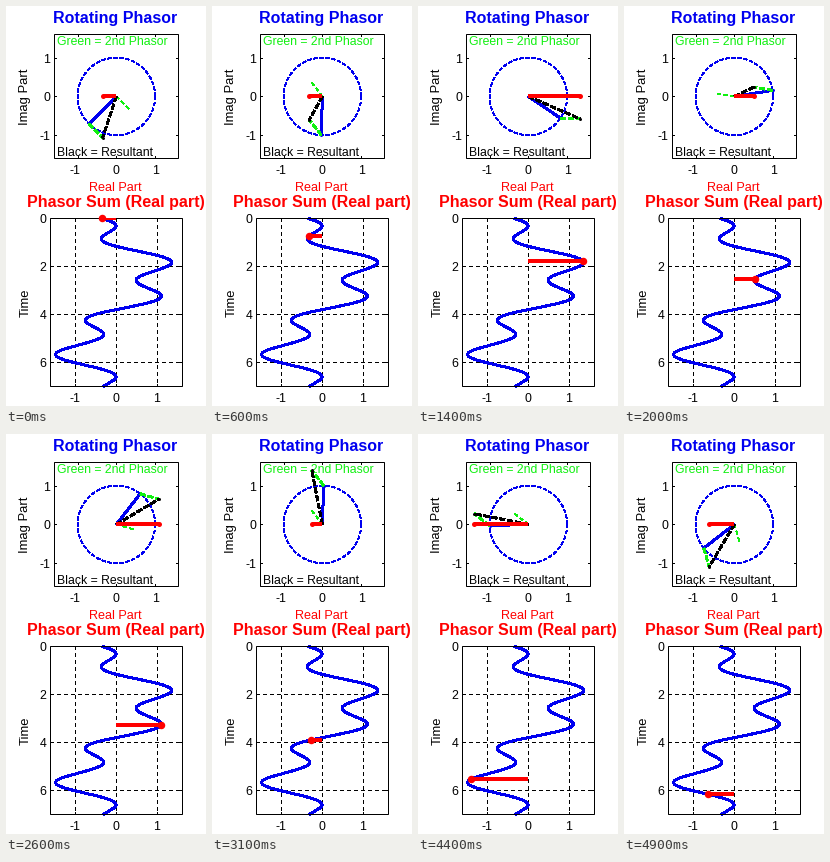
These frames come from a looping animation (200 px wide and 400 px high, 5 s). A matplotlib script:

```python
import numpy as np
import matplotlib.pyplot as plt
from matplotlib.animation import FuncAnimation
from matplotlib.patches import Rectangle

WIDTH, HEIGHT, DPI = 200, 400, 100
PX = 72 / DPI  # points per pixel
FRAMES, INTERVAL = 50, 100
BLUE, RED, GREEN, BLACK = "#0000f0", "#ff0000", "#10f010", "#000000"

CX, CY, UNIT = 110, 90, 38.75       # phasor plot: centre and pixels per unit
TOP, X_UNIT, T_UNIT = 212, 41, 24   # time plot: start and pixels per unit
SHIFT = 0.4  # puts whole coordinates near pixel centres, so lines snap in place

plt.rcParams["font.family"] = "Liberation Sans"
fig = plt.figure(figsize=(WIDTH / DPI, HEIGHT / DPI), dpi=DPI, facecolor="white")
ax = fig.add_axes([0, 0, 1, 1])
ax.set_xlim(-SHIFT, WIDTH - SHIFT)
ax.set_ylim(HEIGHT - SHIFT, -SHIFT)
ax.axis("off")


def first(t):
    return np.exp(1j * (t - 3 * np.pi / 4))


def second(t):
    return 0.5 * np.exp(1j * (4 * t - np.pi / 4))


def line(xs=(), ys=(), color=BLACK, width=1, dash=None, dot=0, z=2):
    style = (0, dash) if dash else "-"
    return ax.plot(xs, ys, color=color, lw=width * PX, ls=style, zorder=z,
                   marker="o" if dot else None, markevery=[-1] if dot else None,
                   ms=dot * PX, mew=0, solid_capstyle="butt",
                   dash_capstyle="butt", antialiased=False)[0]


def label(x, y, text, size=12.4, color=BLACK, ha="center", va="baseline", **kw):
    ax.text(x, y, text, fontsize=size * PX, color=color, ha=ha, va=va, **kw)


def frame_box(x, y, w, h, x_ticks, y_ticks):
    box = Rectangle((x, y), w, h, fill=False, ec=BLACK, lw=PX, zorder=3)
    ax.add_patch(box)
    for tx in x_ticks:
        line([tx, tx], [y, y + 2])
        line([tx, tx], [y + h, y + h - 2])
    for ty in y_ticks:
        line([x, x + 2], [ty, ty])
        line([x + w, x + w - 2], [ty, ty])
    return box


def place(artist, start, end):
    points = np.array([start, end])
    artist.set_data(CX + UNIT * points.real, CY - UNIT * points.imag)


# Phasor plot
frame_box(48, 28, 124, 124,
          [CX + UNIT * v for v in (-1, 0, 1)], [CY - UNIT * v for v in (-1, 0, 1)])
angle = np.linspace(0, 2 * np.pi, 200)
line(CX + UNIT * np.cos(angle), CY - UNIT * np.sin(angle), BLUE, 1, (3, 2.5))
label(109, 17, "Rotating Phasor", 16, BLUE, weight="bold")
label(51, 39, "Green = 2nd Phasor", 12.3, GREEN, "left")
label(51, 150, "Black = Resultant", 12.3, ha="left")
label(109, 185, "Real Part", 12.6, RED)
label(19, 90, "Imag Part", 13, va="center", rotation=90)
for v, x in ((-1, 69), (0, 110), (1, 149)):
    label(x, 168, f"{v}")
    label(44, CY - UNIT * v + 5, f"{v}", ha="right")

# Time plot
x_grid = [CX + X_UNIT * v for v in (-1, 0, 1)]
t_grid = [TOP + T_UNIT * v for v in (2, 4, 6)]
for x in x_grid:
    line([x, x], [TOP, 380], dash=(4, 3), z=1)
for y in t_grid:
    line([44, 176], [y, y], dash=(4, 3), z=1)
time_box = frame_box(44, TOP, 132, 168, x_grid, t_grid)
times = np.linspace(0, 7, 400)
line(CX + X_UNIT * (first(times) + second(times)).real, TOP + T_UNIT * times, BLUE, 2)
label(109, 201, "Phasor Sum (Real part)", 16, RED, weight="bold")
label(19, 296, "Time", 13, va="center", rotation=90)
for v, x in ((-1, 69), (0, 110), (1, 150)):
    label(x, 396, f"{v}")
for v in (0, 2, 4, 6):
    label(40, TOP + T_UNIT * v + 5, f"{v}", ha="right")

# Moving parts
blue = line(color=BLUE, width=2, dot=3, z=4)
green_origin = line(color=GREEN, width=1, dash=(4, 3), z=4)
green_tip = line(color=GREEN, width=1.7, dash=(3, 1.5), z=5)
resultant = line(color=BLACK, width=1.7, dash=(3, 1.5), dot=3, z=6)
real_part = line(color=RED, width=4, dot=5, z=7)
time_bar = line(color=RED, width=4, z=7)
time_bar.set_clip_path(time_box)
time_dot = line(color=RED, dot=7.5, z=8)
moving = [blue, green_origin, green_tip, resultant, real_part, time_bar, time_dot]


def update(i):
    t = 2 * np.pi * i / FRAMES
    a, b = first(t), second(t)
    total = a + b
    place(blue, 0, a)
    place(green_origin, 0, b)
    place(green_tip, a, total)
    place(resultant, 0, total)
    place(real_part, 0, total.real)
    x, y = CX + X_UNIT * total.real, TOP + T_UNIT * t
    time_bar.set_data([CX, x], [y, y])
    time_dot.set_data([x], [y])
    return moving


anim = FuncAnimation(fig, update, frames=FRAMES, interval=INTERVAL,
                     repeat=True, repeat_delay=0)
plt.show()
```
